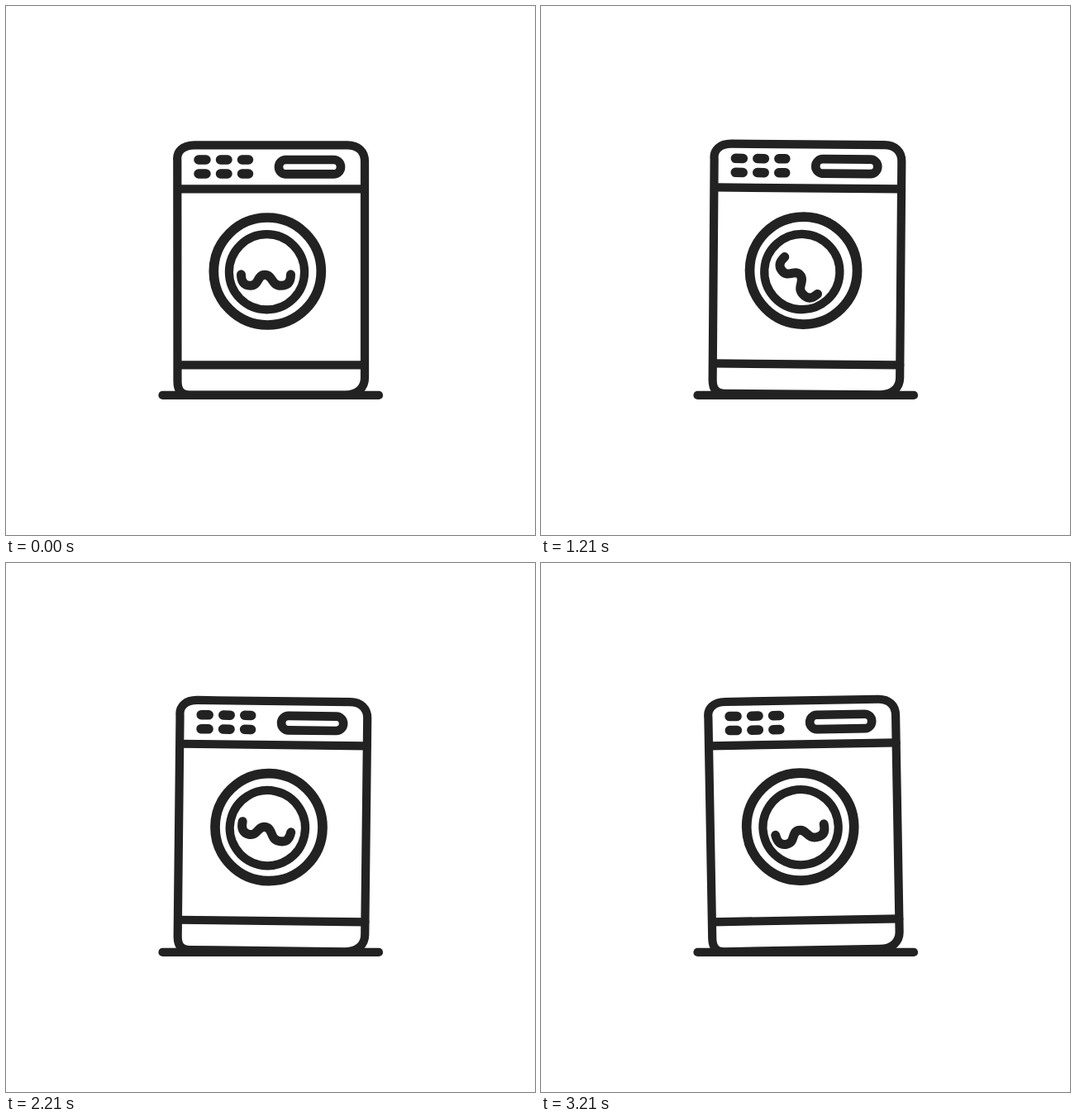
Animation of 640x640 px, one loop 3.28 s. Source, as an HTML page:

```html
<!DOCTYPE html>
<html lang="en">
<head>
<meta charset="utf-8">
<title>Washing machine</title>
<style>
  html, body { margin: 0; height: 100%; overflow: hidden; background: #fff; }
  svg { display: block; width: 100%; height: 100%; }
</style>
</head>
<body>
<svg viewBox="0 0 640 640" fill="none" stroke="#222" stroke-width="10.2" stroke-linecap="round" stroke-linejoin="round">
  <g id="machine">
    <path d="M207.3 187C206 176 214 168.3 228 168.3H413C426 168.3 434 176 434 188V450C434 462 425 470.5 410 470.5H222C212 470.5 207.5 465 207.5 454Z"/>
    <path d="M208 221.3H434M208 434.3H434"/>
    <path stroke-width="11.5" d="M233 186h9m17.5 0h8.5m17.5 0h8M233 203h9m17.5 0h8.5m17.5 0h8"/>
    <rect x="330" y="186" width="75" height="17.4" rx="8.7" stroke-width="10.7"/>
    <circle cx="316.3" cy="321" r="65" stroke-width="11.7"/>
    <circle id="drum" cx="315.5" cy="321.8" r="45.6"/>
    <path id="wave" stroke-width="11" d="M284.5 325c0 8 3 13.5 11 13.5c11 0 8-13 17.5-13c10 0 8 13 19.5 13c9 0 12-5 12-13.5"/>
  </g>
  <path d="M189.5 470.9H451"/>
</svg>
<script>
const LOOP = 3280, FPS = 14, HALF = 23, SPIN = 24;
const [machine, drum, wave] = ['machine', 'drum', 'wave'].map(id => document.getElementById(id));
const bump = (x, width) => Math.exp(-((x / width) ** 2));
const place = (el, dx, dy, angle, x, y) =>
  el.setAttribute('transform', `translate(${dx} ${dy}) rotate(${angle} ${x} ${y})`);

// Early-peaking rock to the right, then a late-peaking rock to the left
function rock(phase) {
  const x = phase * 2 % 1;
  return phase < 0.5
    ? Math.sin(Math.PI * (1 - (1 - x) ** 1.15))
    : -1.1 * Math.sin(Math.PI * x ** 2);
}

function draw(ms) {
  const step = Math.floor((ms % LOOP + 5) * FPS / 1000) % (2 * HALF);
  const second = step >= HALF;
  const m = step % HALF;
  const tilt = rock((m / 5 + (second ? 0.5 : 0)) % 1);
  const angle = SPIN * m + (second ? 180 : 0);
  const slosh = -1.2 * tilt;
  const hop = second ? 0 : -6.5 * bump(m - 7, 3);

  place(machine, 0, 0, tilt, tilt > 0 ? 434 : 207, 470);
  place(drum, slosh, hop, angle, 314.5, 321.8);
  place(wave, slosh, hop - 5 * bump(m - 7.5, 4), angle, 312, 325.5);
}

const start = performance.now();
function tick() {
  draw(performance.now() - start);
  requestAnimationFrame(tick);
}
tick();
</script>
</body>
</html>
```
